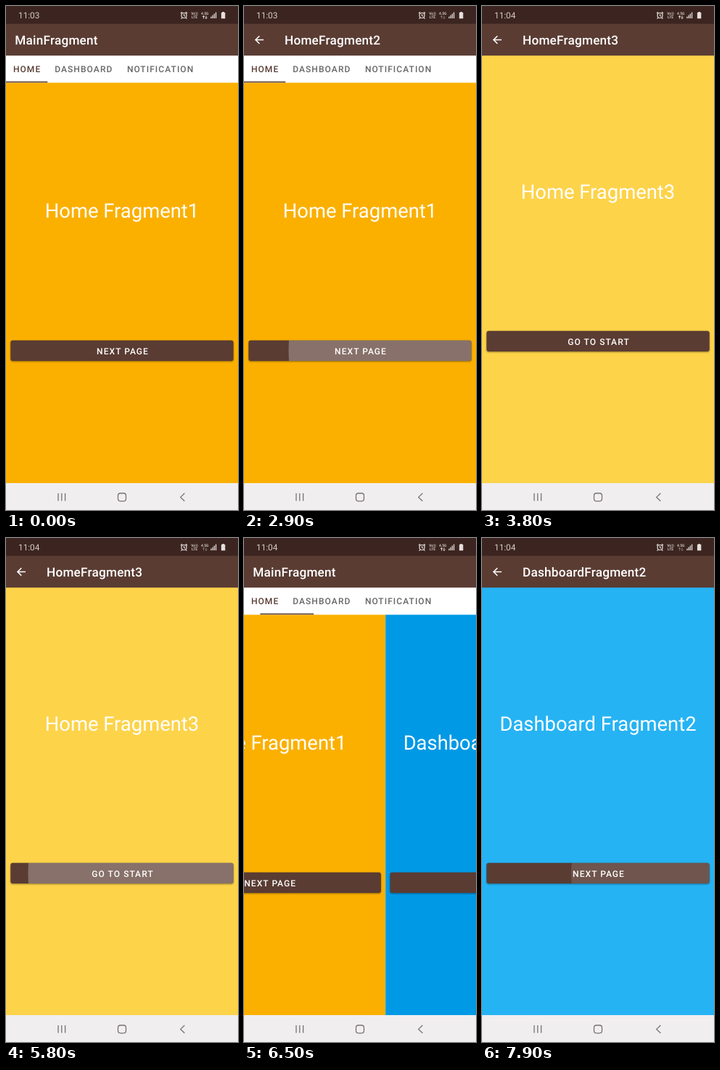
These frames come from a looping animation (320 px wide and 693 px high, 8000 ms). An HTML page:

```html
<!DOCTYPE html>
<html lang="en">
<head>
<meta charset="utf-8">
<title>Tabs and fragments</title>
<style>
  html, body { margin: 0; width: 100%; height: 100%; overflow: hidden; }
  svg { display: block; width: 100%; height: 100%; }
  text { font-family: Roboto, Inter, sans-serif; text-rendering: geometricPrecision; }
  .title { font-size: 17.2px; font-weight: 500; letter-spacing: .0125em; fill: #fff; }
  .caps { font-size: 12px; font-weight: 500; letter-spacing: .0893em; }
  .heading { font-size: 27.4px; fill: #fff; text-anchor: middle; }
  .tiny { font-size: 5px; font-weight: 500; fill: #e4dedc; text-anchor: middle; }
  .button { filter: drop-shadow(0 1px 1px rgba(0, 0, 0, .42)); }
</style>
</head>
<body>
<svg id="stage" viewBox="0 0 320 693" preserveAspectRatio="none"></svg>
<script>
const DURATION = 8000;
const BROWN = '#5a3c33';
const GREY = '#666';
const stage = document.getElementById('stage');

const TABS = [
  { label: 'HOME', x: 0, width: 57.3 },
  { label: 'DASHBOARD', x: 57.3, width: 99.7 },
  { label: 'NOTIFICATION', x: 157, width: 112 },
];

const PAGES = {
  home1: { color: '#fbb000', heading: 'Home Fragment1', tabbed: true },
  home2: { color: '#fdc826', heading: 'Home Fragment2' },
  home3: { color: '#fdd34a', heading: 'Home Fragment3', label: 'GO TO START' },
  dash1: { color: '#0099e5', heading: 'Dashboard Fragment1', tabbed: true },
  dash2: { color: '#26b3f3', heading: 'Dashboard Fragment2' },
};

// Each step overrides the state left by the steps before it.
const STEPS = [
  { at: 0, title: 'MainFragment', page: 'home1', scroll: 0, edge: null, glow: .27, clock: '11:03', busy: true },
  { at: 700, busy: false },
  { at: 2900, title: 'HomeFragment2', edge: 61.5 },
  { at: 3000, page: 'home2', edge: null },
  { at: 3100, clock: '11:04' },
  { at: 3700, title: 'HomeFragment3', edge: 62 },
  { at: 3800, page: 'home3', edge: null, busy: true },
  { at: 4900, busy: false },
  { at: 5700, edge: 110, glow: .16 },
  { at: 5800, edge: 30.5, glow: .27 },
  { at: 5900, title: 'MainFragment', page: 'home1', edge: null, busy: true },
  { at: 6500, scroll: .39 },
  { at: 6600, scroll: .78, busy: false },
  { at: 6700, scroll: .96 },
  { at: 6800, scroll: 1 },
  { at: 7300, title: 'DashboardFragment2', page: 'dash2' },
  { at: 7900, edge: 123, glow: .13 },
];

function pageMarkup([id, { color, heading, label = 'NEXT PAGE', tabbed }]) {
  const top = tabbed ? 105.3 : 68;
  const headingY = tabbed ? 291.3 : 265.3;
  const buttonY = tabbed ? 459.8 : 446.8;
  return `<g id="${id}">
    <rect y="${top}" width="320" height="${656 - top}" fill="${color}"/>
    <text class="heading" x="160" y="${headingY}">${heading}</text>
    <rect class="button" x="6.3" y="${buttonY}" width="307.4" height="28.2" rx="3" fill="${BROWN}"/>
    <g clip-path="url(#${tabbed ? 'upper' : 'lower'})">
      <circle class="ripple" cy="${buttonY + 14}" fill="#fff"/>
    </g>
    <text class="caps" x="161" y="${buttonY + 19.2}" fill="#fff" text-anchor="middle">${label}</text>
  </g>`;
}

const clip = (id, y) =>
  `<clipPath id="${id}"><rect x="6.3" y="${y}" width="307.4" height="28.2" rx="3"/></clipPath>`;

const signalBars = [0, 1, 2, 3].map(i =>
  `<rect x="${282.3 + i * 2.2}" y="${14.6 - i * 2}" width="1.3" height="${2.4 + i * 2}"/>`).join('');

stage.innerHTML = `
  <defs>${clip('upper', 459.8)}${clip('lower', 446.8)}</defs>
  ${Object.entries(PAGES).map(pageMarkup).join('')}
  <g id="tabs">
    <rect y="68" width="320" height="37.3" fill="#fff"/>
    ${TABS.map(t => `<text class="caps tab" x="${t.x + 9.9}" y="91.4">${t.label}</text>`).join('')}
    <rect id="indicator" y="103.7" height="1.6" fill="${BROWN}"/>
  </g>
  <rect y="24" width="320" height="44.2" fill="${BROWN}"/>
  <path id="back" d="M27 46.5H16.2M21.3 41.2 16 46.5 21.3 51.8" fill="none" stroke="#fff" stroke-width="1.6"/>
  <text id="title" class="title" y="53"></text>
  <rect width="320" height="24.5" fill="#3c2520"/>
  <text id="clock" x="17" y="17" font-size="11.8" fill="#d5cbc8"></text>
  <g fill="none" stroke="#e4dedc" stroke-width="1.2">
    <circle cx="245.5" cy="13" r="3.5"/>
    <path d="M245.5 11v2.2l1.6 1M241 10.2l2-1.9M250 10.2l-2-1.9M242.8 16l-1.2 1.6M248.2 16l1.2 1.6"/>
  </g>
  <text class="tiny" x="260" y="11.7">Vo))</text>
  <text class="tiny" x="260" y="17.2">LTE</text>
  <text class="tiny" x="274.2" y="11.9">4.5G</text>
  <path id="traffic" d="M272.5 17.5v-4M271 15l1.5-1.8 1.5 1.8M276 13.2v4M274.5 15.7l1.5 1.8 1.5-1.8" fill="none" stroke="#e4dedc" stroke-width=".9"/>
  <g fill="#e4dedc">${signalBars}
    <path d="M298.3 8h2.6v1h1.4v8.2h-5.4V9h1.4z"/>
  </g>
  <rect y="656" width="320" height="37" fill="#f0eeef"/>
  <g fill="none" stroke="#77736f" stroke-width="1.3">
    <path d="M72 670v10.6M76.8 670v10.6M81.6 670v10.6"/>
    <rect x="154.5" y="670" width="11" height="10.8" rx="3.2"/>
    <path d="M246.3 670 240.7 675.4 246.3 680.8"/>
  </g>`;

const $ = id => document.getElementById(id);
const mix = (a, b, t) => a + (b - a) * t;
const tabLabels = stage.querySelectorAll('.tab');
const ripples = stage.querySelectorAll('.ripple');

function stateAt(time) {
  return Object.assign({}, ...STEPS.filter(step => step.at <= time));
}

function showPage(id, visible, x = 0) {
  $(id).setAttribute('display', visible ? 'inline' : 'none');
  $(id).setAttribute('transform', `translate(${x})`);
}

function drawTabs(scroll) {
  const [from, to] = TABS;
  $('indicator').setAttribute('x', mix(from.x, to.x, scroll));
  $('indicator').setAttribute('width', mix(from.width, to.width, scroll));
  const selected = Math.round(scroll);
  tabLabels.forEach((label, i) => label.setAttribute('fill', i === selected ? BROWN : GREY));
}

function drawRipple(edge, glow) {
  const center = 250;
  ripples.forEach(ripple => {
    ripple.setAttribute('cx', center);
    ripple.setAttribute('r', edge === null ? 0 : center - edge);
    ripple.setAttribute('fill-opacity', glow);
  });
}

function draw(time) {
  const { title, page, scroll, edge, glow, clock, busy } = stateAt(time);
  const tabbed = Boolean(PAGES[page].tabbed);
  const isMain = title === 'MainFragment';

  for (const id in PAGES) showPage(id, id === page);
  if (tabbed) {
    showPage('home1', scroll < 1, -320 * scroll);
    showPage('dash1', scroll > 0, 320 * (1 - scroll));
  }
  $('tabs').setAttribute('display', tabbed ? 'inline' : 'none');
  drawTabs(scroll);
  drawRipple(edge, glow);

  $('title').textContent = title;
  $('title').setAttribute('x', isMain ? 12.3 : 56);
  $('back').setAttribute('display', isMain ? 'none' : 'inline');
  $('clock').textContent = clock;
  $('traffic').setAttribute('opacity', busy ? 1 : .4);
}

const start = performance.now();
function tick() {
  draw((performance.now() - start) % DURATION);
  requestAnimationFrame(tick);
}
tick();
</script>
</body>
</html>
```
